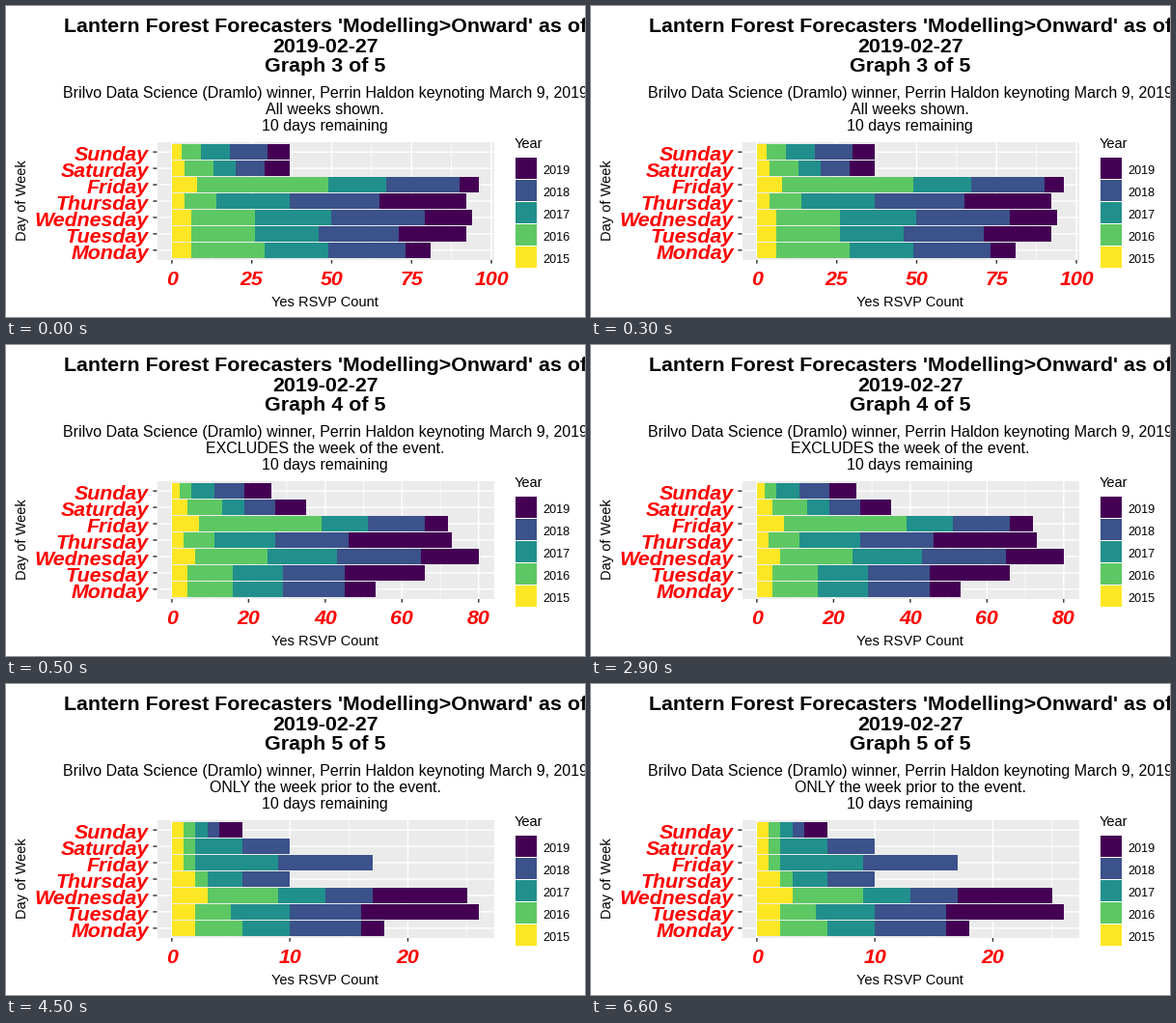
Animation, 600 px wide and 322 px high, one loop 8000 ms. Source, as a matplotlib script:

```python
import matplotlib.pyplot as plt
from matplotlib.animation import FuncAnimation
from matplotlib.patches import Rectangle

W, H, DPI = 600, 322, 64
STEP = 500  # ms per tick
plt.rcParams["font.family"] = "Liberation Sans"

# Panel edges in pixels
LEFT, RIGHT, TOP, BOTTOM = 156, 505.7, 141, 263
MID = (LEFT + RIGHT) / 2
ROW = (BOTTOM - TOP) / 7.2

DAYS = ["Sunday", "Saturday", "Friday", "Thursday", "Wednesday", "Tuesday", "Monday"]
COLORS = ["#FDE725", "#5DC863", "#21908C", "#3B528B", "#440154"]

# Key points of each bar: running totals for 2016, 2018 and 2019, Sunday first
GRAPHS = [
    dict(number=3, ticks=1, step=25, note="All weeks shown.",
         keys=[(9, 30, 37), (13, 29, 37), (49, 90, 96), (14, 65, 92),
               (26, 79, 94), (26, 71, 92), (29, 73, 81)]),
    dict(number=4, ticks=8, step=20, note="EXCLUDES the week of the event.",
         keys=[(5, 19, 26), (13, 27, 35), (39, 66, 72), (11, 46, 73),
               (25, 65, 80), (16, 45, 66), (16, 45, 53)]),
    dict(number=5, ticks=7, step=10, note="ONLY the week prior to the event.",
         keys=[(2, 4, 6), (2, 10, 10), (2, 17, 17), (3, 10, 10),
               (9, 17, 25), (5, 16, 26), (6, 16, 18)]),
]
SCHEDULE = [g for g in GRAPHS for _ in range(g["ticks"])]

fig = plt.figure(figsize=(W / DPI, H / DPI), dpi=DPI, facecolor="white")
ax = fig.add_axes([0, 0, 1, 1])
ax.set_xlim(0, W)
ax.set_ylim(H, 0)
ax.axis("off")


def text(x, y, s, px, ha="center", **kw):
    return ax.text(x, y, s, fontsize=px * 72 / DPI, ha=ha, va="baseline", **kw)


def rect(x0, y0, x1, y1, color, z):
    x0, y0, x1, y1 = (round(v) for v in (x0, y0, x1, y1))
    return ax.add_patch(Rectangle((x0, y0), x1 - x0, y1 - y0, fc=color, lw=0,
                                  antialiased=False, zorder=z))


def line(x0, y0, x1, y1, color, px):
    return ax.plot([x0, x1], [y0, y1], color=color, lw=px * 72 / DPI, zorder=2,
                   solid_capstyle="butt", snap=False)[0]


def row_y(i):
    return TOP + (i + 0.6) * ROW


def running_totals(second, fourth, total):
    """Fill in 2015 and 2017 from their neighbours."""
    first = round(0.8 * second ** 0.6)
    third = round(second + 0.45 * (fourth - second))
    return first, second, third, fourth, total


def draw_static():
    text(MID, 27, "Lantern Forest Forecasters 'Modelling>Onward' as of", 21.33,
         weight="bold")
    text(MID, 48, "2019-02-27", 21.33, weight="bold")
    text(MID, 95, "Brilvo Data Science (Dramlo) winner, "
                  "Perrin Haldon keynoting March 9, 2019", 16)
    text(MID, 129, "10 days remaining", 16)
    text(MID - 0.5, 311, "Yes RSVP Count", 14.67)
    text(21, (TOP + BOTTOM) / 2 - 0.5, "Day of Week", 14.67, rotation=90,
         rotation_mode="anchor")

    rect(LEFT + 1, TOP, RIGHT, BOTTOM, "#EBEBEB", 1)
    for i, day in enumerate(DAYS):
        y = row_y(i)
        line(LEFT, y, RIGHT, y, "white", 1.42)
        line(LEFT - 3.67, y, LEFT + 0.5, y, "#333333", 1.42)
        text(147.8, y + 8.8, day, 21.33, "right", color="red", weight="bold",
             style="italic")

    text(527, 147, "Year", 14.67, "left")
    for i, color in enumerate(reversed(COLORS)):
        y = 168.1 + 23.04 * i
        rect(528, y - 10.8, 550, y + 10.8, color, 3)
        text(556.7, y + 5.6, str(2019 - i), 12.6, "left")


def draw_graph(g):
    bars = [running_totals(*k) for k in g["keys"]]
    peak = max(bar[-1] for bar in bars)
    unit = (RIGHT - LEFT) / 1.1 / peak
    zero = LEFT + 0.05 * peak * unit
    art = [text(MID, 68, f"Graph {g['number']} of 5", 21.33, weight="bold"),
           text(MID, 112, g["note"], 16)]

    half = 0
    while half * g["step"] / 2 <= peak * 1.05:
        x = zero + half * g["step"] / 2 * unit
        major = half % 2 == 0
        art.append(line(x, TOP, x, BOTTOM, "white", 1.42 if major else 0.71))
        if major:
            art.append(line(x, BOTTOM, x, BOTTOM + 3.67, "#333333", 1.42))
            art.append(text(x, 289, str(half // 2 * g["step"]), 21.33,
                            color="red", weight="bold", style="italic"))
        half += 1

    for i, bar in enumerate(bars):
        y, start = row_y(i), 0
        for end, color in zip(bar, COLORS):
            if end > start:
                art.append(rect(zero + start * unit, y - 0.47 * ROW,
                                zero + end * unit, y + 0.47 * ROW, color, 3))
            start = end
    return art


draw_static()
shown = []


def update(tick):
    while shown:
        shown.pop().remove()
    shown.extend(draw_graph(SCHEDULE[tick]))
    return shown


anim = FuncAnimation(fig, update, frames=len(SCHEDULE), init_func=lambda: [],
                     interval=STEP, repeat=True, repeat_delay=0, blit=False)
plt.show()
```
